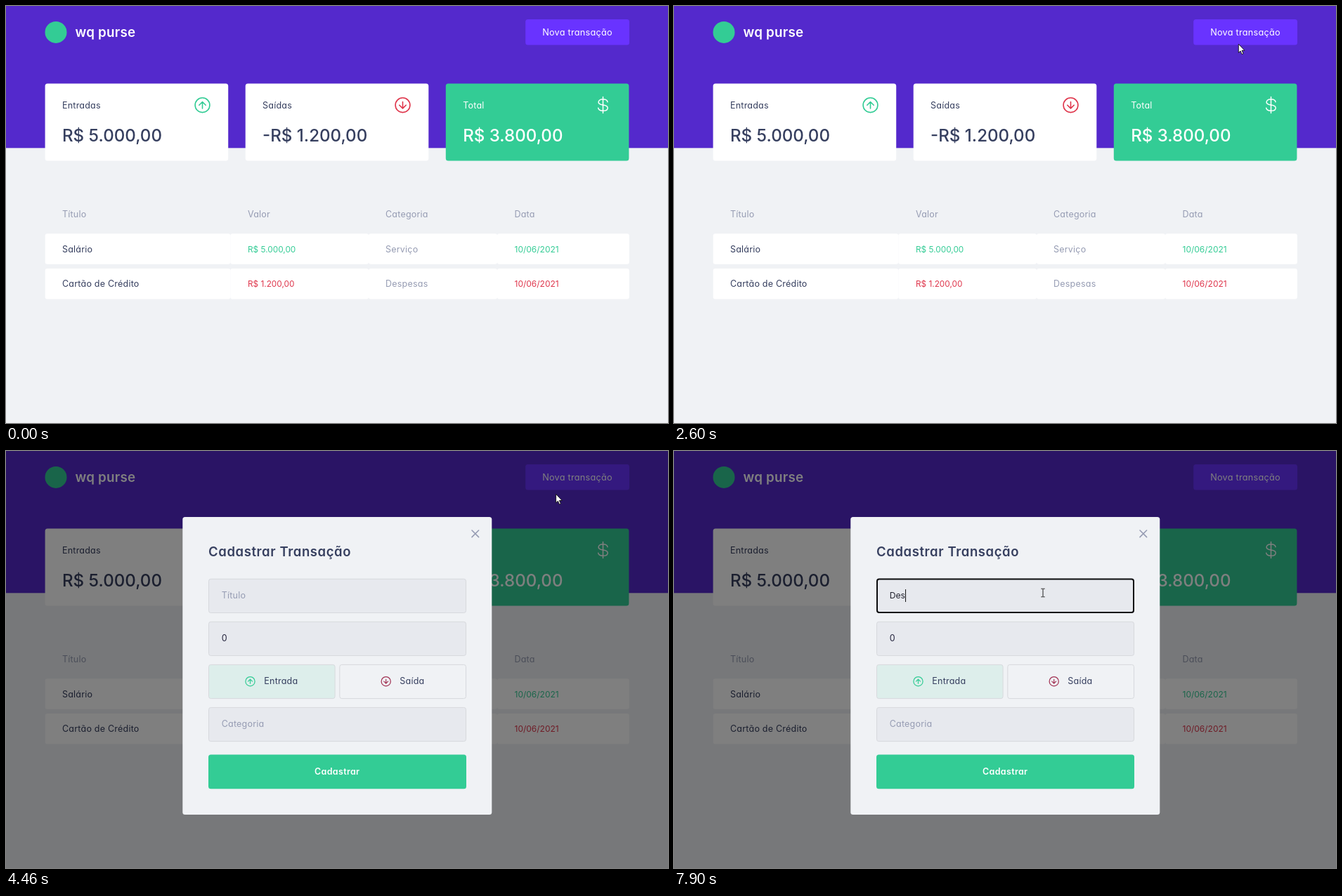
Animation of 942x594 px, one loop 8 s. Source, as an HTML page:

```html
<!DOCTYPE html>
<html lang="pt-BR">
<head>
<meta charset="utf-8">
<title>Controle financeiro</title>
<style>
  html, body { margin: 0; width: 100%; height: 100%; overflow: hidden; background: #f0f2f5; }
  svg { display: block; width: 942px; height: 594px; }
  text {
    font: 400 12.5px Inter, "Open Sans", sans-serif;
    font-feature-settings: "cv11"; /* single-storey a */
    letter-spacing: .22px;
    white-space: pre;
  }
  .brand { font-weight: 600; font-size: 18.8px; }
  .action { font-size: 12.7px; letter-spacing: .25px; }
  .amount { font-weight: 500; font-size: 24.1px; letter-spacing: 0; }
  .value { font-size: 11.8px; letter-spacing: 0; }
  .date { font-size: 12px; letter-spacing: 0; }
  .heading { font-weight: 600; font-size: 18.5px; letter-spacing: .6px; }
  .submit { font-weight: 600; letter-spacing: .35px; }
  .typed { font-size: 12.2px; letter-spacing: 0; }
  .plain { font-family: "Liberation Sans", Arial, sans-serif; font-weight: 700; letter-spacing: 0; }
  .plain.heading { font-size: 18.3px; }
  .plain.submit { font-size: 12.2px; }
</style>
</head>
<body>
<svg id="stage" viewBox="0 0 942 594" xmlns="http://www.w3.org/2000/svg"></svg>
<script>
const LOOP = 8000;
const DARK = '#363f5f', MUTED = '#969cb3', GREEN = '#33cc95', RED = '#df364c', WHITE = '#fff';

const rect = (x, y, w, h, fill, extra = '') =>
  `<rect x="${x}" y="${y}" width="${w}" height="${h}" fill="${fill}" ${extra}/>`;
const text = (x, y, str, fill, cls = '', extra = '') =>
  `<text x="${x}" y="${y}" fill="${fill}" class="${cls}" ${extra}>${str}</text>`;
const centered = 'text-anchor="middle"';

function arrowIcon(x, y, r, color, down, width) {
  const a = r * 0.45;
  return `<g transform="translate(${x} ${y}) scale(1 ${down ? -1 : 1})" fill="none" stroke="${color}"
    stroke-width="${width}" stroke-linecap="round" stroke-linejoin="round">
    <circle r="${r}"/><path d="M0 ${a}V${-a}M${-a} 0L0 ${-a} ${a} 0"/></g>`;
}

const dollarIcon = `<path transform="translate(849.5 141)" fill="none" stroke="#fff" stroke-width="1.5"
  stroke-linecap="round" d="M0-11.6V11.6M6.5-4.3C6-7 3.5-8.2 0-8.2S-6.4-6.8-6.4-4
  C-6.4-1-3 -.5 0 0S6.7 1 6.7 4.2C6.7 7 3.8 8.3 0 8.3S-6.5 7-6.8 4.2"/>`;

function card(x, label, amount, fill, color) {
  return rect(x, 110.6, 260.6, 110, fill, 'rx="3.5"') +
    text(x + 24.4, 146, label, color) + text(x + 24.4, 192.6, amount, color, 'amount');
}

function row(y, title, value, category, date, color) {
  const edges = [55.7, 319.3, 516, 699, 886.8];
  return edges.slice(0, 4).map((x, i) =>
    rect(x, y, edges[i + 1] - x, 43.5, WHITE, 'rx="3"')).join('') +
    text(80, y + 26.3, title, DARK) + text(344, y + 26.3, value, color, 'value') +
    text(540, y + 26.3, category, MUTED) + text(723.5, y + 26.3, date, color, 'date');
}

const page = rect(0, 0, 942, 594, '#f0f2f5') + rect(0, 0, 942, 202.3, '#5429cc') +
  `<circle cx="71" cy="37.4" r="15.5" fill="${GREEN}"/>` +
  text(98.5, 43.6, 'wq purse', WHITE, 'brand') +
  rect(739.2, 19, 147.8, 36.6, '#6933ff', 'rx="3.5" id="button"') +
  text(813, 42.2, 'Nova transação', WHITE, 'action', centered) +
  card(55.6, 'Entradas', 'R$ 5.000,00', WHITE, DARK) +
  card(340.7, 'Saídas', '-R$ 1.200,00', WHITE, DARK) +
  card(625.8, 'Total', 'R$ 3.800,00', GREEN, WHITE) +
  arrowIcon(279.5, 141.2, 10.4, GREEN, false, 1.6) +
  arrowIcon(564.5, 141.2, 10.4, RED, true, 1.6) + dollarIcon +
  [[80, 'Título'], [344, 'Valor'], [540, 'Categoria'], [723.5, 'Data']]
    .map(([x, s]) => text(x, 301, s, MUTED)).join('') +
  row(324.3, 'Salário', 'R$ 5.000,00', 'Serviço', '10/06/2021', GREEN) +
  row(374, 'Cartão de Crédito', 'R$ 1.200,00', 'Despesas', '10/06/2021', RED);

const outline = 'rx="3" stroke="#d7d9dd"';
const field = y => rect(288.5, y, 366, 48.2, '#e7e9ee', outline);

const modal = rect(0, 0, 942, 594, '#000', 'opacity=".5"') +
  rect(251.3, 94, 440, 424, '#f0f2f5', 'rx="3.5" id="panel"') +
  text(288, 150, 'Cadastrar Transação', DARK, 'heading', 'id="heading"') +
  `<path id="close" d="M663 113l9.6 9.6m0-9.6l-9.6 9.6" stroke="${MUTED}" stroke-width="1.6" stroke-linecap="round"/>
  <g id="form">` +
  field(182.3) + field(243.3) + field(365.4) +
  rect(288.5, 304.4, 179.6, 48.2, '#ddeeeb', outline) +
  rect(474.8, 304.4, 179.7, 48.2, '#f0f2f5', outline) +
  rect(288, 432.4, 367, 48.8, GREEN, 'rx="3.5"') +
  text(306.7, 210.3, 'Título', MUTED, '', 'id="placeholder"') +
  text(306.7, 271.2, '0', '#26263f') +
  text(367.3, 332.3, 'Entrada', DARK) + text(560.3, 332.3, 'Saída', DARK) +
  text(306.7, 393.3, 'Categoria', MUTED) +
  arrowIcon(347.5, 328.2, 6.6, GREEN, false, 1.2) +
  `<g id="outIcon">${arrowIcon(540.7, 328.2, 6.6, 'currentColor', true, 1.2)}</g>` +
  text(471.2, 460.5, 'Cadastrar', WHITE, 'submit', `${centered} id="submit"`) +
  `<g id="focus">${rect(289, 182.6, 365, 47.4, 'none', 'rx="3" stroke="#0b0b0d" stroke-width="2"')}
  ${text(306.7, 210.3, '', '#22222e', 'typed', 'id="typed"')}
  ${rect(0, 197, 1, 18, '#111', 'id="caret"')}</g></g>`;

const pointer = `<g id="pointer"><circle id="press" r="9.5" fill="#f0ee6c"/>
  <path id="arrow" d="M0 0V12.4L2.8 9.8 4.8 14.5 6.8 13.6 4.8 9.1H8.6Z" fill="#fff" stroke="#111" stroke-width=".9"/>
  <path id="beam" d="M-2.6-5.8H-.6L0-5.3 .6-5.8H2.6M0-5.3V5.3M-2.6 5.8H-.6L0 5.3 .6 5.8H2.6" fill="none" stroke="#222"/></g>`;

const stage = document.getElementById('stage');
stage.innerHTML = page + `<g id="modal">${modal}</g>` + pointer;
const ui = {};
stage.querySelectorAll('[id]').forEach(el => ui[el.id] = el);

// time, x, y
const path = [
  [100, 899, 582], [500, 876, 338], [900, 856, 206], [1300, 829, 134], [1700, 812, 91],
  [1800, 808, 84], [2200, 804.5, 63], [2700, 803, 52], [2900, 803, 49], [4260, 803, 49],
  [4760, 752, 80], [5160, 697, 111], [5260, 662, 125], [5560, 565, 150], [6060, 480, 178],
  [6160, 476, 184], [6560, 470, 191], [6760, 470, 191], [6960, 506, 195.5], [7160, 525, 202]
];
const typing = [[7610, 'D'], [7770, 'De'], [7900, 'Des']];

const show = (el, on) => el.setAttribute('display', on ? 'inline' : 'none');
const ramp = (t, a, b) => Math.min(1, Math.max(0, (t - a) / (b - a)));
const within = (t, a, b) => t >= a && t < b;

function pointerAt(t) {
  const i = path.findIndex(p => p[0] > t);
  if (i < 0) return path[path.length - 1].slice(1);
  if (i === 0) return path[0].slice(1);
  const [t0, x0, y0] = path[i - 1], [t1, x1, y1] = path[i];
  const k = ramp(t, t0, t1);
  return [x0 + (x1 - x0) * k, y0 + (y1 - y0) * k];
}

function render(t) {
  // The screen is sampled ten times a second.
  const phase = t < 3640 ? 0 : 60;
  const tick = Math.floor((t - phase) / 100) * 100 + phase;

  const hover = ramp(tick, 2700, 2900) * (1 - ramp(tick, 3560, 3860));
  const dim = 1 - 0.1 * hover;
  ui.button.setAttribute('fill', `rgb(${105 * dim},${51 * dim},${255 * dim})`);

  const styled = t >= 4360;
  show(ui.modal, t >= 3640);
  show(ui.close, styled);
  ui.panel.setAttribute('y', styled ? 94 : 96.3);
  ui.panel.setAttribute('height', styled ? 424 : 418.5);
  ui.heading.setAttribute('y', styled ? 150 : 149.6);
  ui.heading.classList.toggle('plain', !styled);
  ui.submit.classList.toggle('plain', !styled);
  ui.form.setAttribute('transform', `translate(0 ${styled ? 0 : -2.9})`);
  ui.outIcon.setAttribute('color', styled ? '#a03052' : '#5f3a44');

  const typed = typing.reduce((s, [at, str]) => t >= at ? str : s, '');
  show(ui.focus, t >= 6760);
  show(ui.placeholder, !typed);
  ui.typed.textContent = typed;
  show(ui.caret, !within(t, 7380, 7610));
  ui.caret.setAttribute('x', typed ? 306.7 + ui.typed.getComputedTextLength() : 307);

  const [x, y] = pointerAt(tick);
  const overField = t >= 6160;
  show(ui.pointer, t >= 100);
  ui.pointer.setAttribute('transform', `translate(${x} ${y})`);
  show(ui.arrow, !overField);
  show(ui.beam, overField);
  show(ui.press, within(t, 3300, 3440) || within(t, 6600, 6760));
}

const start = performance.now();
function loop() {
  render((performance.now() - start) % LOOP);
  requestAnimationFrame(loop);
}
loop();
</script>
</body>
</html>
```
